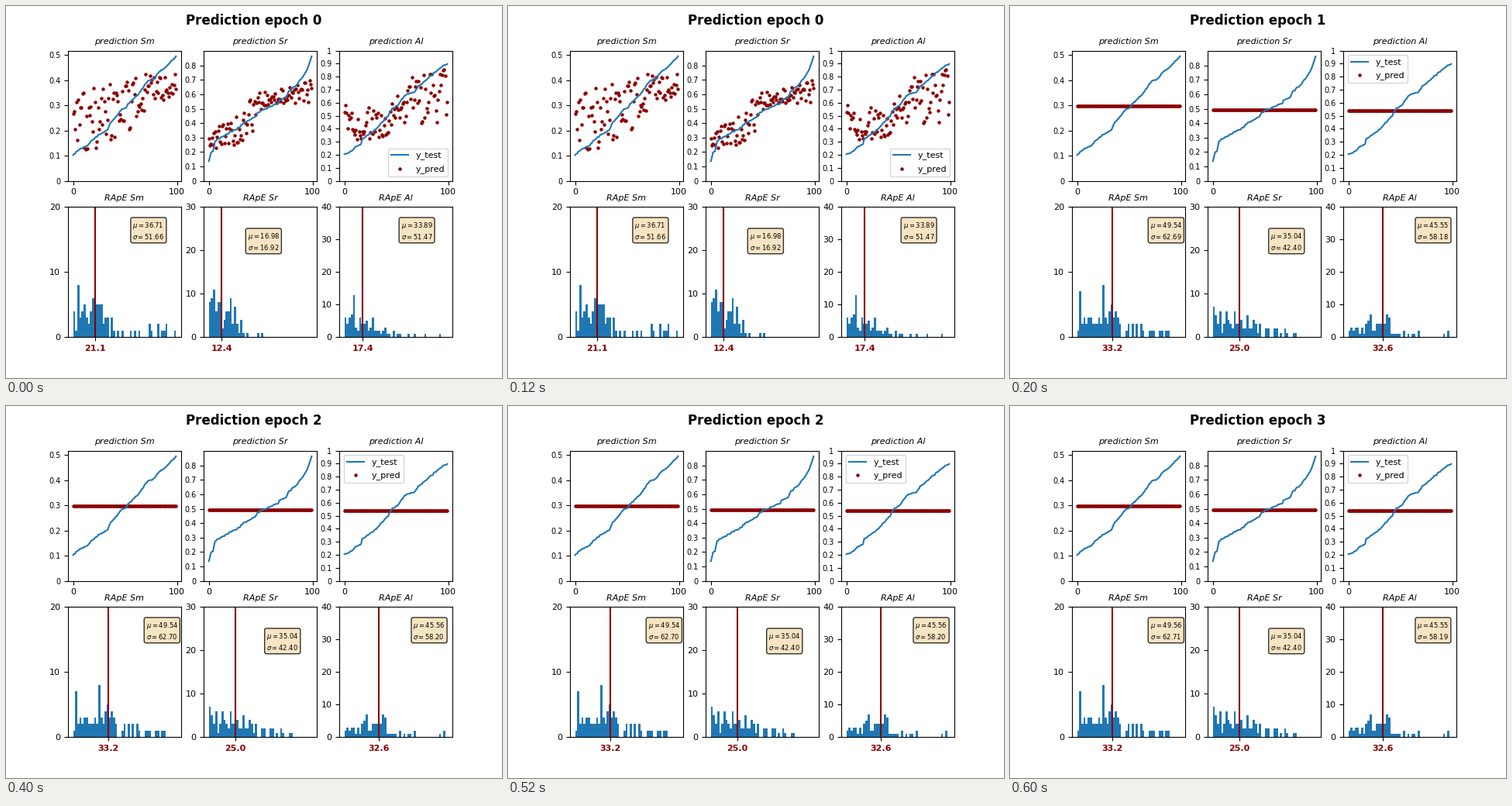
Recreate the animation shown at these times as a matplotlib script. Size 640 px wide and 480 px high, loop 0.8 s.

```python
import numpy as np
import matplotlib.pyplot as plt
from matplotlib.animation import FuncAnimation

plt.rcParams["font.family"] = "DejaVu Sans"
INDEX = np.arange(100)
BINS = np.arange(0, 100, 2)

# Curves are (index, value) knots. "trend" and "spread" shape the untrained predictions.
PANELS = {
    "Sm": dict(
        test=[(0, .102), (5, .124), (13, .138), (21, .172), (32, .2), (37, .234),
              (47, .285), (51, .29), (53, .307), (61, .335), (72, .396), (78, .406),
              (82, .434), (88, .447), (99, .495)],
        trend=[(0, .22), (15, .25), (50, .28), (70, .36), (99, .38)],
        spread=[(0, .09), (15, .13), (55, .11), (75, .06), (99, .05)],
        mean=.297, value_top=.518, last_tick=5, count_top=20, note_y=15, seed=4,
        medians=(21.1, 33.2),
        stats=[(36.71, 51.66), (49.54, 62.69), (49.54, 62.70), (49.56, 62.71)]),
    "Sr": dict(
        test=[(0, .13), (2, .195), (4, .207), (6, .277), (14, .311), (30, .374),
              (33, .405), (39, .416), (50, .485), (67, .541), (68, .562), (74, .57),
              (77, .62), (84, .662), (90, .712), (96, .79), (99, .865)],
        trend=[(0, .28), (20, .33), (30, .4), (45, .47), (50, .57), (75, .59), (99, .62)],
        spread=[(0, .05), (10, .08), (35, .14), (45, .1), (55, .05), (99, .08)],
        mean=.492, value_top=.903, last_tick=8, count_top=30, note_y=20, seed=7,
        medians=(12.4, 25.0),
        stats=[(16.98, 16.92), (35.04, 42.40), (35.04, 42.40), (35.04, 42.40)]),
    "Al": dict(
        test=[(0, .21), (5, .218), (9, .25), (16, .283), (17, .32), (32, .41),
              (43, .51), (46, .555), (51, .577), (59, .665), (68, .685), (71, .725),
              (80, .785), (90, .85), (96, .89), (99, .895)],
        trend=[(0, .5), (15, .43), (40, .46), (60, .62), (99, .67)],
        spread=[(0, .13), (20, .13), (50, .11), (60, .18), (99, .22)],
        mean=.54, value_top=1, last_tick=10, count_top=40, note_y=30, seed=2,
        medians=(17.4, 32.6),
        stats=[(33.89, 51.47), (45.55, 58.18), (45.56, 58.20), (45.55, 58.19)]),
}


def through(knots):
    x, y = np.array(knots).T
    return np.interp(INDEX, x, y)


def add_data(panel):
    rng = np.random.RandomState(panel["seed"])
    jitter = rng.normal(0, .004 * panel["value_top"], 100)
    panel["y_test"] = np.sort(through(panel["test"]) + jitter)
    panel["untrained"] = through(panel["trend"]) + through(panel["spread"]) * rng.uniform(-1, 1, 100)


for panel in PANELS.values():
    add_data(panel)

fig = plt.figure(figsize=(6.4, 4.8), dpi=100)


def draw_prediction(ax, name, panel, y_pred, legend_spot):
    ax.plot(INDEX, panel["y_test"], label="y_test")
    ax.scatter(INDEX, y_pred, s=5, color="darkred", label="y_pred")
    ax.set_title(f"prediction {name}", fontsize=8, style="italic")
    ax.set_xlim(-4.95, 103.95)
    ax.set_ylim(0, panel["value_top"])
    ticks = np.arange(panel["last_tick"] + 1) / 10
    ax.set_xticks([0, 100], ["0", "100"], fontsize=8)
    ax.set_yticks(ticks, [f"{tick:g}" for tick in ticks], fontsize=7)
    if name == "Al":
        ax.legend(fontsize=8, loc=legend_spot)


def draw_errors(ax, name, panel, y_pred, median, stats):
    errors = 100 * np.abs(y_pred - panel["y_test"]) / panel["y_test"]
    ax.hist(errors, bins=BINS)
    ax.axvline(median, color="darkred")
    ax.set_title(f"RApE {name}", fontsize=8, style="italic")
    ax.set_xlim(-4.9, 102.9)
    ax.set_ylim(0, panel["count_top"])
    ax.set_xticks([median], [f"{median:.1f}"], fontsize=8, weight="bold", color="darkred")
    ax.set_yticks(range(0, panel["count_top"] + 1, 10))
    ax.tick_params(axis="y", labelsize=8)

    mu, sigma = stats
    ax.text(mu + 20, panel["note_y"], f"$\\mu={mu:.2f}$\n$\\sigma={sigma:.2f}$",
            fontsize=6, bbox=dict(boxstyle="round", facecolor="wheat", alpha=.8))


def draw(epoch):
    fig.clear()
    fig.suptitle(f"Prediction epoch {epoch}", fontsize=12, weight="bold")
    trained = epoch > 0
    legend_spot = "upper left" if trained else "lower right"
    for (name, panel), (top, bottom) in zip(PANELS.items(), fig.subplots(2, 3).T):
        y_pred = np.full(100, panel["mean"]) if trained else panel["untrained"]
        draw_prediction(top, name, panel, y_pred, legend_spot)
        draw_errors(bottom, name, panel, y_pred, panel["medians"][trained],
                    panel["stats"][epoch])
    return []


animation = FuncAnimation(fig, draw, frames=4, interval=200, init_func=lambda: [],
                          repeat=True, repeat_delay=0)
plt.show()
```
